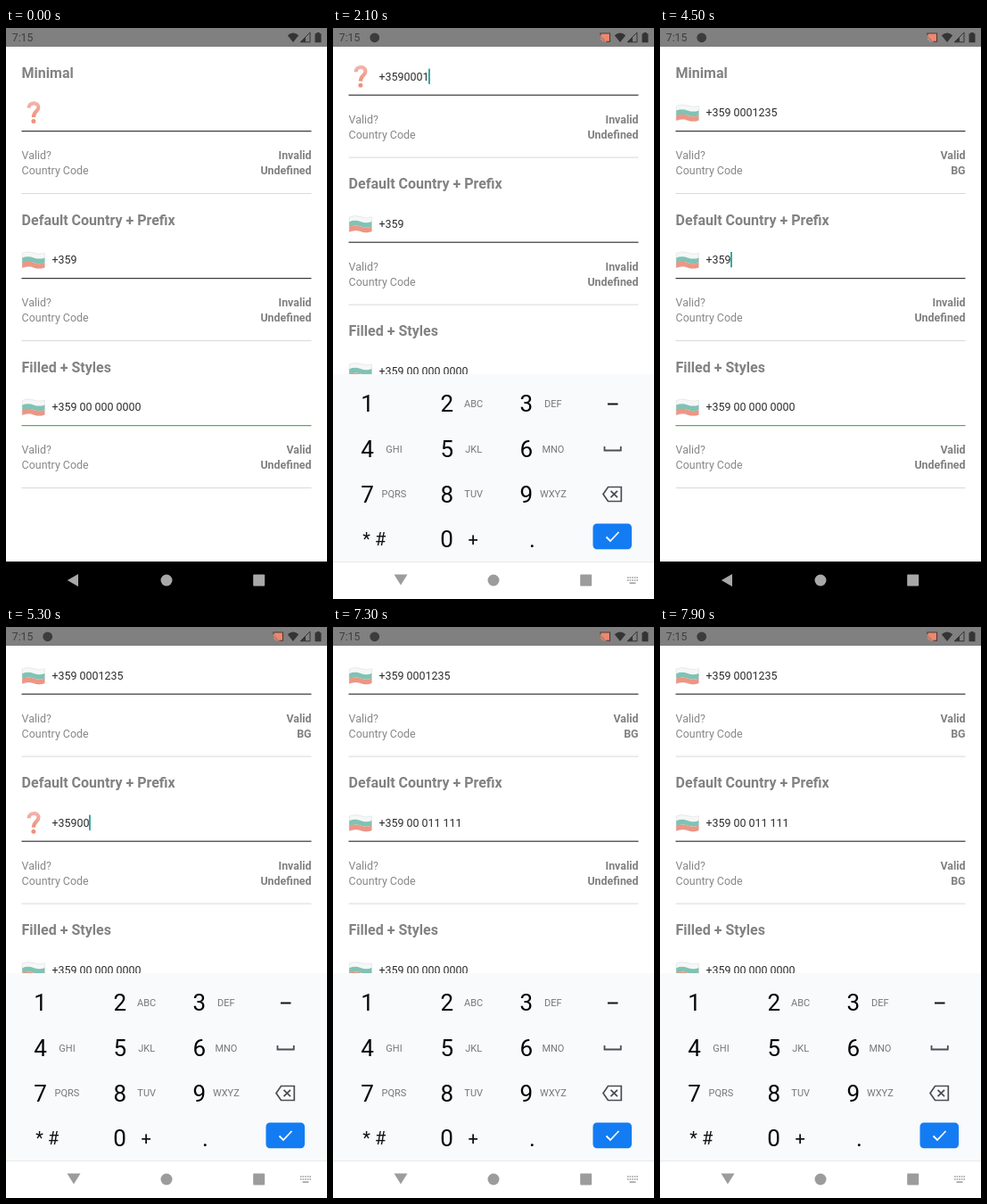
An HTML page that plays this animation: 360x640 px, repeating every 8000 ms.

```html
<!DOCTYPE html>
<html lang="en">
<head>
<meta charset="utf-8">
<title>Phone input demo</title>
<style>
  html, body { margin: 0; width: 100%; height: 100%; overflow: hidden; background: #fff; }
  svg { display: block; width: 100%; height: 100%; }
  text { font-family: Roboto, sans-serif; font-size: 12.45px; white-space: pre; }
  .title { font-size: 16px; font-weight: 700; fill: #828282; }
  .label { fill: #888; }
  .value { font-weight: 700; fill: #808080; text-anchor: end; }
  .input { fill: #2c2c2c; }
  .cursor { fill: #169c91; }
  .digit { font-size: 26px; text-anchor: middle; fill: #050505; }
  .letters { font-size: 11px; text-anchor: middle; fill: #777; }
  .symbol { font-size: 20px; text-anchor: middle; fill: #111; }
  .clock { font-size: 12.2px; fill: #3e3e3e; }
</style>
</head>
<body>
<svg viewBox="0 0 360 640" preserveAspectRatio="none">
  <defs>
    <linearGradient id="red" x1="0" y1="0" x2="0" y2="1">
      <stop offset="0" stop-color="#f2b3ab"/><stop offset="1" stop-color="#ef917d"/>
    </linearGradient>
    <g id="unknown">
      <path d="M25.6 89.6C25.6 82.7 36.8 82.7 36.4 89.2C36.1 93.6 31 93.4 30.9 100" fill="none" stroke="url(#red)" stroke-width="4.2"/>
      <circle cx="30.9" cy="104.6" r="2.5" fill="#ef917d"/>
    </g>
    <g id="flag">
      <path d="M18.2 87.4Q24.5 84.6 31 87T43.4 87.2V92.6Q37 95 31 92.6T18.2 93Z" fill="#f6f7f7"/>
      <path d="M18.2 92.6Q24.5 90 31 92.4T43.4 92.4V98.2Q37 100.4 31 98T18.2 98.4Z" fill="#7fc3b4"/>
      <path d="M18.2 98.2Q24.5 95.6 31 98T43.4 98V103.4Q37 105.8 31 103.4T18.2 103.8Z" fill="#ef9584"/>
      <path d="M18.2 87.4Q24.5 84.6 31 87T43.4 87.2V103.4Q37 105.8 31 103.4T18.2 103.8Z" fill="none" stroke="#999" stroke-opacity=".3" stroke-width=".6"/>
    </g>
  </defs>

  <rect width="360" height="640" fill="#fff"/>
  <g id="content"></g>
  <g id="keyboard">
    <rect y="388" width="360" height="212" fill="#f8fafb"/>
    <rect id="pressed" width="89" height="50.5" fill="#e2e4e6"/>
    <g id="keys"></g>
    <g fill="none" stroke="#4b4f52" stroke-width="1.8">
      <path d="M308 421.5H319.5" stroke="#111" stroke-width="2"/>
      <path d="M304.5 469V473.5H322.8V469"/>
      <path d="M308.5 514.5H323.3V530.5H308.5L303 522.5Z" stroke-width="1.7"/>
      <path d="M311.5 518.8L319 526.2M319 518.8L311.5 526.2"/>
    </g>
    <rect x="291.5" y="555.5" width="43.5" height="28.8" rx="4.5" fill="#147cf3"/>
    <path d="M306.5 570.5L311 575L320.5 565" fill="none" stroke="#fff" stroke-width="1.8"/>
  </g>

  <g id="navDark">
    <rect y="598" width="360" height="42" fill="#000"/>
    <g fill="#a8a8a8">
      <path d="M68.8 619L81 612V626Z"/><circle cx="180" cy="619" r="6.5"/>
      <rect x="277.2" y="612.5" width="13" height="13" rx="1"/>
    </g>
  </g>
  <g id="navLight">
    <rect y="598" width="360" height="42" fill="#fff"/>
    <rect y="598" width="360" height="1" fill="#e9e9e9"/>
    <g fill="#9c9c9c">
      <path d="M68.5 612.5H83.5L76 624.5Z"/><circle cx="180" cy="619" r="6.5"/>
      <rect x="277.2" y="612.5" width="13" height="13" rx="1"/>
      <path d="M330 616H342M330 619H342" stroke="#9c9c9c" stroke-width="1.7" stroke-dasharray="1.6 1"/>
      <rect x="332.5" y="621.4" width="7" height="1.5"/>
    </g>
  </g>

  <rect width="360" height="21" fill="#808080"/>
  <text class="clock" x="6.8" y="15.3">7:15</text>
  <g fill="#343434">
    <path d="M315.8 8.2Q322 2.8 328.2 8.2L322 16Z"/>
    <path d="M341 5V15.8H330.2Z" fill="none" stroke="#343434"/>
    <path d="M336 10.4V15.8H330.2Z"/>
    <path d="M346.5 6.2H348.3V5H351.7V6.2H353.5V16.2H346.5Z"/>
  </g>
  <g id="recording">
    <circle cx="46.7" cy="10.8" r="5.4" fill="#3c3c3c"/>
    <path d="M300 8V6H310.5V15.3H306.5" fill="#ef876e" stroke="#4d3a36" stroke-width="1.1"/>
    <path d="M300 10A5.5 5.5 0 0 1 305.3 15.5M300 12.4A3 3 0 0 1 303 15.5" fill="none" stroke="#ef876e" stroke-width="1.2"/>
  </g>
</svg>

<script>
const LOOP = 8000, PITCH = 165, SCROLL = 40.4, TEXT_X = 51.4;
const $ = id => document.getElementById(id);

const text = (cls, x, y, s) => `<text class="${cls}" x="${x}" y="${y}">${s}</text>`;
const line = (y, color, w) => `<rect x="17.5" y="${y}" width="325" height="${w}" fill="${color}"/>`;

const section = (title, i) => `<g transform="translate(0 ${i * PITCH})">
  ${text('title', 17.6, 55.8, title)}
  <use class="icon"/>
  ${text('input', TEXT_X, 99.3, '')}
  <rect class="cursor" y="86" width="1.7" height="17.3"/>
  ${line(115, i === 2 ? '#4fae53' : '#383838', 1.2)}
  ${text('label', 17.6, 147.4, 'Valid?')}${text('value valid', 342.6, 147.4, '')}
  ${text('label', 17.6, 164.4, 'Country Code')}${text('value code', 342.6, 164.4, '')}
  ${line(185, '#d9d9d9', 1)}
</g>`;

$('content').innerHTML =
  ['Minimal', 'Default Country + Prefix', 'Filled + Styles'].map(section).join('');
const sections = [...$('content').children].map(g => {
  const part = name => g.querySelector('.' + name);
  return { icon: part('icon'), input: part('input'), cursor: part('cursor'),
           valid: part('valid'), code: part('code') };
});

const letters = ['', 'ABC', 'DEF', 'GHI', 'JKL', 'MNO', 'PQRS', 'TUV', 'WXYZ'];
$('keys').innerHTML = letters.map((s, i) => {
  const x = 38.5 + i % 3 * 89.2, y = 430.4 + Math.floor(i / 3) * 50.6;
  return text('digit', x, y, i + 1) + text('letters', x + 30, y - 5.4, s);
}).join('') + text('symbol', 46.3, 580, '* #') + text('digit', 127.5, 582, 0) +
  text('symbol', 157.2, 580.3, '+') + text('digit', 223.5, 582, '.');

// Each step changes part of the state and holds until the next one.
const steps = [
  [0, { a: '', b: '+359', flagA: 0, flagB: 1, okA: 0, okB: 0, focus: -1, key: 0, open: 0, rec: 0 }],
  [100, { focus: 0, open: .5, rec: 1 }],
  [200, { open: 1 }],
  [400, { focus: -1 }],
  [500, { focus: 0 }],
  [700, { a: '+' }],
  ...[...'359000123'].map((_, i, d) =>
    [[900, 1100, 1300, 1500, 1700, 1900, 2100, 2400, 2600][i], { a: '+' + d.slice(0, i + 1).join('') }]),
  [2800, { a: '+3590001235', key: 5 }],
  [2900, { a: '+359 0001235', flagA: 1, key: 0 }],
  [3100, { focus: -1 }],
  [3400, { focus: 0 }],
  [3500, { focus: -1 }],
  [3600, { open: .5, okA: 1 }],
  [3700, { open: 0 }],
  [4500, { focus: 1 }],
  [4600, { open: .5 }],
  [4700, { open: 1 }],
  [4900, { focus: -1 }],
  [5100, { b: '+3590', flagB: 0, focus: 1 }],
  [5300, { b: '+35900' }],
  [5500, { b: '+359000' }],
  [5700, { focus: -1 }],
  [5900, { b: '+3590001', focus: 1, key: 1 }],
  [6000, { key: 0 }],
  [6100, { b: '+35900011' }],
  [6200, { b: '+359000111', key: 1 }],
  [6400, { b: '+3590001111', key: 0 }],
  [6600, { b: '+35900011111', key: 1 }],
  [6800, { b: '+359 00 011 111', flagB: 1, key: 0 }],
  [7000, { focus: -1 }],
  [7200, { focus: 1 }],
  [7300, { focus: -1 }],
  [7400, { open: .5, okB: 1 }],
  [7500, { open: 0 }],
  [7800, { open: .5 }],
  [7900, { open: 1 }]
];

const show = (el, on) => el.setAttribute('visibility', on ? 'visible' : 'hidden');

function drawSection(s, value, flag, valid, code, focused) {
  s.icon.setAttribute('href', flag ? '#flag' : '#unknown');
  s.input.textContent = value;
  s.valid.textContent = valid ? 'Valid' : 'Invalid';
  s.code.textContent = code;
  show(s.cursor, focused);
  if (focused) s.cursor.setAttribute('x', TEXT_X - .3 + (value ? s.input.getComputedTextLength() : 0));
}

function draw(t) {
  const st = Object.assign({}, ...steps.filter(([at]) => at <= t).map(step => step[1]));
  const code = ok => ok ? 'BG' : 'Undefined';
  drawSection(sections[0], st.a, st.flagA, st.okA, code(st.okA), st.focus === 0);
  drawSection(sections[1], st.b, st.flagB, st.okB, code(st.okB), st.focus === 1);
  drawSection(sections[2], '+359 00 000 0000', 1, 1, code(0), false);

  $('content').setAttribute('transform', `translate(0 ${-SCROLL * st.open})`);
  $('keyboard').setAttribute('transform', `translate(0 ${(1 - st.open) * 120})`);
  $('keyboard').setAttribute('opacity', st.open && .2 + .8 * st.open);
  show($('navLight'), st.open);
  show($('navDark'), !st.open);
  show($('recording'), st.rec);
  show($('pressed'), st.key);
  if (st.key) {
    $('pressed').setAttribute('x', 1.8 + (st.key - 1) % 3 * 89);
    $('pressed').setAttribute('y', 395 + Math.floor((st.key - 1) / 3) * 50.6);
  }
}

const start = performance.now();
function tick() {
  draw((performance.now() - start) % LOOP);
  requestAnimationFrame(tick);
}
tick();
</script>
</body>
</html>
```
